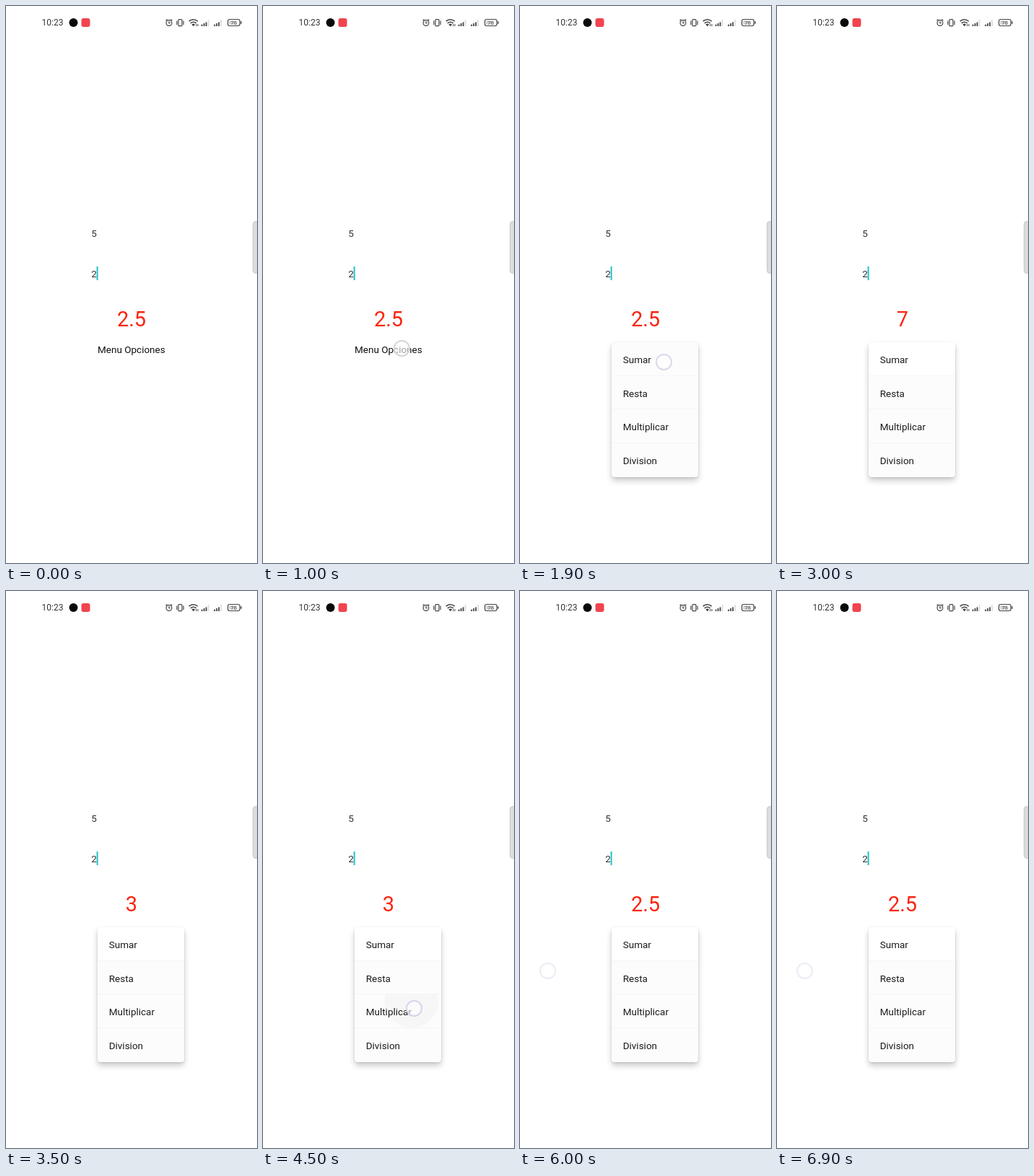
Recreate the animation shown at these times as an HTML page. Size 348x772 px, loop 7 s.

```html
<!DOCTYPE html>
<html lang="es">
<head>
<meta charset="utf-8">
<title>Menu Opciones</title>
<style>
  html, body { margin: 0; width: 100%; height: 100%; overflow: hidden; background: #fff; }
  body { position: relative; font-family: Roboto, sans-serif; }
  svg { position: absolute; left: 0; top: 0; }
  #menu {
    position: absolute; left: 127px; top: 466px; width: 120px; height: 187px;
    overflow: hidden; border-radius: 4px; background: #fcfcfc;
    box-shadow: 0 5px 8px rgba(0, 0, 0, .2), 0 1px 3px rgba(0, 0, 0, .1);
  }
  .item {
    box-sizing: border-box; width: 120px; height: 46.6px; padding-left: 15.7px;
    overflow: hidden; white-space: nowrap; border-bottom: 1px solid #f5f5f5;
    font-size: 13.5px; line-height: 49px; color: #1c1c1c;
  }
  .item:last-child { border: 0; }
  #touch {
    position: absolute; box-sizing: border-box; width: 23px; height: 23px;
    border: 2px solid; border-radius: 50%; background: rgba(255, 255, 255, .6);
  }
</style>
</head>
<body>
<svg width="348" height="772" viewBox="0 0 348 772">
  <g fill="none" stroke="#444" stroke-width="1.2">
    <circle cx="226" cy="23.5" r="3.9"/>
    <path d="M226 21.3v2.4h1.8M221.6 20.2l2-1.8M230.4 20.2l-2-1.8"/>
    <rect x="239" y="18.7" width="5" height="9" rx="1"/>
    <path d="M236.9 20.5v5.5M246.1 20.5v5.5"/>
    <path d="M253.8 21.2q6-4.8 12 0M255.8 23.8q4-3.2 8 0" stroke-width="1.6"/>
    <path d="M263.8 25v3M266 25v3" stroke-width="1"/>
    <rect x="307.6" y="18.5" width="16.6" height="9" rx="2.4"/>
    <path d="M326 21.3v3.4" stroke-width="1.4"/>
  </g>
  <path d="M257.4 25.4q2.4-1.6 4.8 0l-2.4 2.8z" fill="#444"/>
  <rect x="309.3" y="20.2" width="11" height="5.6" rx="1" fill="#d4d4d4"/>
  <g id="bars" stroke-width="1.8"></g>
  <circle cx="93.5" cy="23" r="6" fill="#0a0a0a"/>
  <rect x="104.5" y="17" width="12" height="12" rx="3" fill="#f0444f"/>
  <rect x="342.5" y="298.5" width="12" height="72" rx="4" fill="#dcdcdc" stroke="#c8c8c8"/>
  <text x="49.5" y="27.4" font-size="12" fill="#333">10:23</text>
  <text x="315.7" y="25.8" font-size="7.5" fill="#555" text-anchor="middle">76</text>
  <g font-size="13.5" fill="#333">
    <text x="118.3" y="320">5</text>
    <text x="118.3" y="376">2</text>
    <text x="127" y="481" fill="#111">Menu Opciones</text>
  </g>
  <rect id="caret" x="125.6" y="361" width="2" height="19" fill="#22c0c8"/>
  <text id="result" x="174" y="444.4" font-size="29" fill="#fa2410" text-anchor="middle"></text>
</svg>
<div id="menu"></div>
<div id="touch"></div>
<script>
const LOOP = 7000, STEP = 100;
const MENU = { w: 120, h: 187, open: 1200, grow: 300 };
const $ = id => document.getElementById(id);
const [menu, touch, caret, result] = ['menu', 'touch', 'caret', 'result'].map($);

// start, end, x, y, ring colour
const touches = [
  [1000, 1200, 192, 474, '#d6d6d6'],
  [1900, 2100, 199, 493, '#dbd9ea'],
  [3100, 3200, 205, 538, '#dbd9ea'],
  [4500, 4600, 209, 578, '#d9d4ec'],
  [5500, 5600, 205, 628, '#dbd7ea'],
  [6000, 6200, 38, 526, '#ececf6'],
  [6700, 7000, 38, 526, '#ececf6']
];
// start, x, y within the row
const ripples = [[1960, 72, 18], [3030, 78, 18], [4420, 79, 9], [5420, 76, 9]];
const results = [[0, '2.5'], [2100, '7'], [3200, '3'], [4700, '10'], [5700, '2.5']];

const items = ['Sumar', 'Resta', 'Multiplicar', 'Division'].map(label => {
  const item = document.createElement('div');
  item.className = 'item';
  item.textContent = label;
  menu.append(item);
  return item;
});

for (const left of [271.6, 289.2]) {
  for (let i = 0; i < 4; i++) {
    const x = left + i * 3;
    const height = i < 3 ? 2.4 + i * 1.6 : 9;
    $('bars').innerHTML +=
      `<path d="M${x} 28v${-height}" stroke="${i < 3 ? '#444' : '#dcdcdc'}"/>`;
  }
}

const clamp = v => Math.min(1, Math.max(0, v));
const ease = p => p * p * (3 - 2 * p);

function drawMenu(t) {
  const p = ease(clamp((t - MENU.open) / MENU.grow));
  menu.style.display = p ? 'block' : 'none';
  menu.style.width = MENU.w * p + 'px';
  menu.style.height = MENU.h * p + 'px';
  menu.style.opacity = p;
  items.forEach((item, i) => {
    const [start, x, y] = ripples[i];
    const age = t - start;
    const r = age * 0.46;
    const a = 0.022 * (1 - clamp((age - 200) / 250));
    item.style.backgroundColor = i === 0 && t >= 2400 ? '#fff' : 'transparent';
    item.style.backgroundImage = age > 0 && a > 0
      ? `radial-gradient(circle at ${x}px ${y}px, rgba(20,20,40,${a}) ${r}px, transparent ${r + 1}px)`
      : 'none';
  });
}

function drawTouch(t) {
  const hit = touches.find(([start, end]) => t >= start && t < end);
  touch.style.display = hit ? 'block' : 'none';
  if (!hit) return;
  const [, , x, y, color] = hit;
  touch.style.left = x - 11.5 + 'px';
  touch.style.top = y - 11.5 + 'px';
  touch.style.borderColor = color;
}

function draw(t) {
  caret.style.opacity = t >= 100 && t < 500 ? 0 : 1;
  result.textContent = results.filter(([start]) => t >= start).pop()[1];
  drawMenu(t);
  drawTouch(t);
}

const begin = performance.now();
function tick() {
  const t = (performance.now() - begin) % LOOP;
  draw(Math.floor(t / STEP) * STEP);
  requestAnimationFrame(tick);
}
tick();
</script>
</body>
</html>
```
